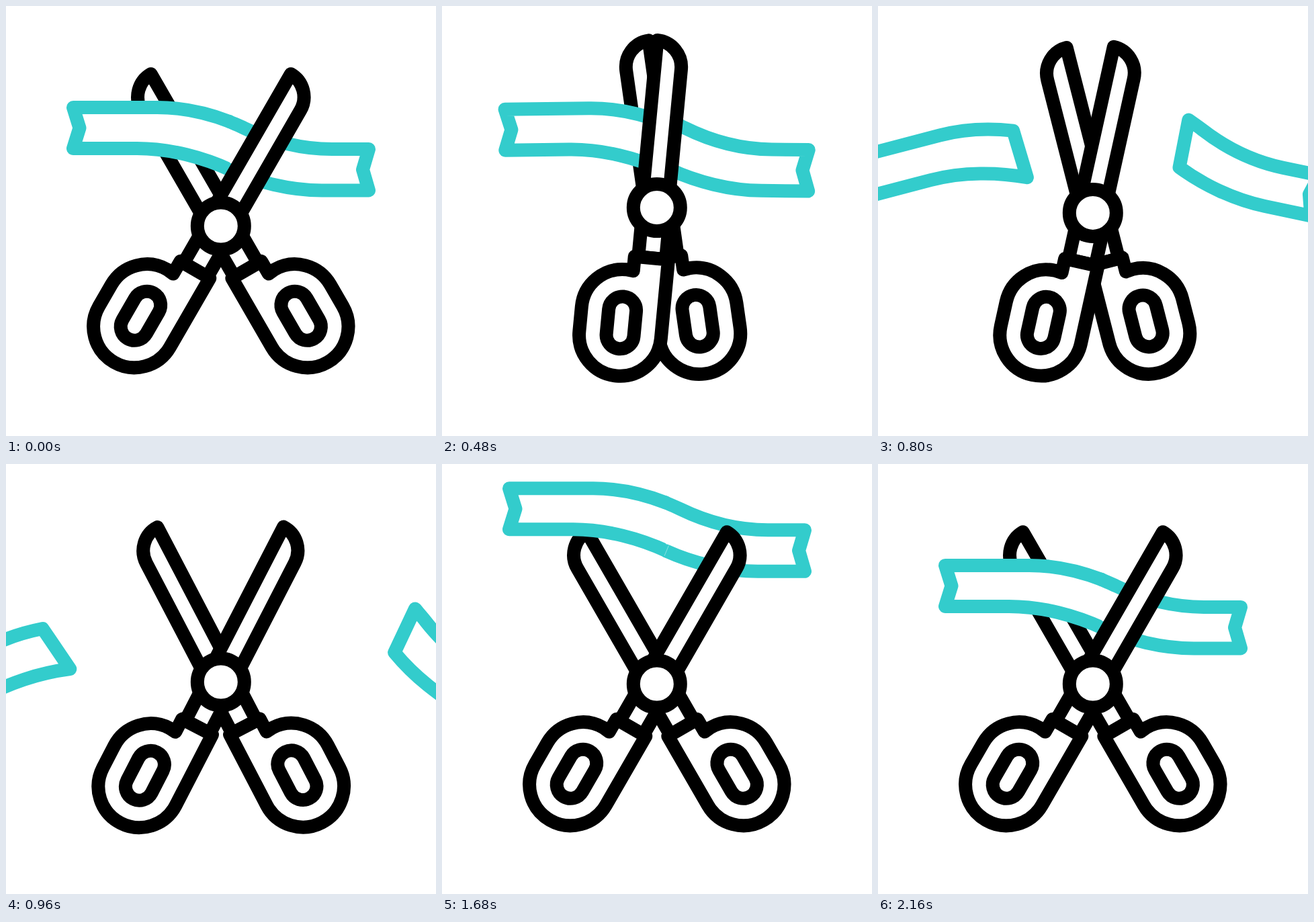
These frames come from a looping animation (640x640 px, 2.2 s). An HTML page:

```html
<!DOCTYPE html>
<html lang="en">
<head>
<meta charset="utf-8">
<title>Ribbon cutting</title>
<style>
  html, body { margin: 0; width: 100%; height: 100%; overflow: hidden; background: #fff; }
  svg { display: block; width: 100%; height: 100%; }
  .ink, .ribbon { fill: #fff; stroke-width: 20; stroke-linejoin: round; stroke-linecap: round; }
  .ink { stroke: #000; }
  .ribbon { stroke: #33cccc; }
</style>
</head>
<body>
<svg viewBox="0 0 640 640">
  <defs>
    <!-- One scissor half, upright, with the screw at the origin -->
    <g id="half" class="ink">
      <path d="M-20.5 0H20.5V75.5H-20.5Z"/>
      <path d="M-23 -248A39.5 40 0 0 1 16.5 -208V0H-23Z"/>
      <path d="M-26 75.5V97L-36.5 96A61 61 0 0 0 -97.5 157V194A61 61 0 0 0 24.5 194V75.5Z"/>
      <rect x="-57" y="136.5" width="41" height="78" rx="20.5"/>
    </g>
  </defs>
  <use id="back" href="#half"/>
  <g id="band">
    <path id="left" class="ribbon"/>
    <path id="right" class="ribbon"/>
    <path id="seam" d="M331 251.5L337.5 236" stroke="#fff" stroke-width=".7" opacity=".6"/>
  </g>
  <use id="front" href="#half"/>
  <circle id="screw" class="ink" cx="319.8" r="35"/>
</svg>
<script>
  const LOOP = 2200, STEP = 40;
  const CLOSED = 560, OPEN = 1120;      // scissors
  const CUT = 328, GONE = 1200, DROP = 1460; // ribbon
  const CURVE = 2.7;

  const LEFT = "M332.5 172C300 159.5 264 151 225 151H100L109.5 181.5 100 212H195C245 212 295 226 335 244.5";
  const RIGHT = "M332.5 172C339 175 347 178 355 182C390 199 435 213 485 213H540" +
    "L531 243.5 540 274.5H470C423 274.5 373 262 333.5 244";

  const [back, front, screw, band, left, right, seam] =
    ["back", "front", "screw", "band", "left", "right", "seam"].map(id => document.getElementById(id));
  const set = (el, name, value) => el.setAttribute(name, value);
  const show = (el, on) => set(el, "visibility", on ? "inherit" : "hidden");

  const smooth = u => u * u * (3 - 2 * u);
  const strong = u => u < 0.5 ? 0.5 * (2 * u) ** 2.8 : 1 - 0.5 * (2 - 2 * u) ** 2.8;

  // 0 = fully open, 1 = fully closed
  function closing(t) {
    if (t < CLOSED) return smooth(t / CLOSED);
    if (t < OPEN) return 1 - strong((t - CLOSED) / (OPEN - CLOSED));
    return 0;
  }

  function drawScissors(t) {
    const c = closing(t), y = 327.5 - 29 * c;
    const place = `translate(319.8 ${y})`;
    set(front, "transform", `${place} rotate(${30 - 26 * c})`);
    set(back, "transform", `${place} rotate(${23.2 * c - 30}) scale(-1 1)`);
    set(screw, "cy", y);
  }

  function drawRibbon(t) {
    const falling = t >= DROP, cut = t > CUT && !falling;
    const p = cut ? ((t - CUT) / (960 - CUT)) ** CURVE : 0;
    const dy = falling ? -42.5 * ((LOOP - t) / 360) ** CURVE : 0;
    const end = cut ? "Z" : "";

    set(band, "visibility", t < GONE || falling ? "visible" : "hidden");
    set(band, "transform", `translate(0 ${dy})`);
    show(seam, falling);
    set(left, "d", LEFT + end);
    set(right, "d", RIGHT + end);
    set(left, "transform", `rotate(${-32.2 * p} 320 690)`);
    set(right, "transform", `translate(${-117 * p} ${-32.6 * p}) rotate(${26 * p} 364.5 1062)`);
  }

  const start = performance.now();
  function frame() {
    const now = Math.max(0, performance.now() - start) % LOOP;
    const t = now - now % STEP;
    drawScissors(t);
    drawRibbon(t);
    requestAnimationFrame(frame);
  }
  frame();
</script>
</body>
</html>
```
